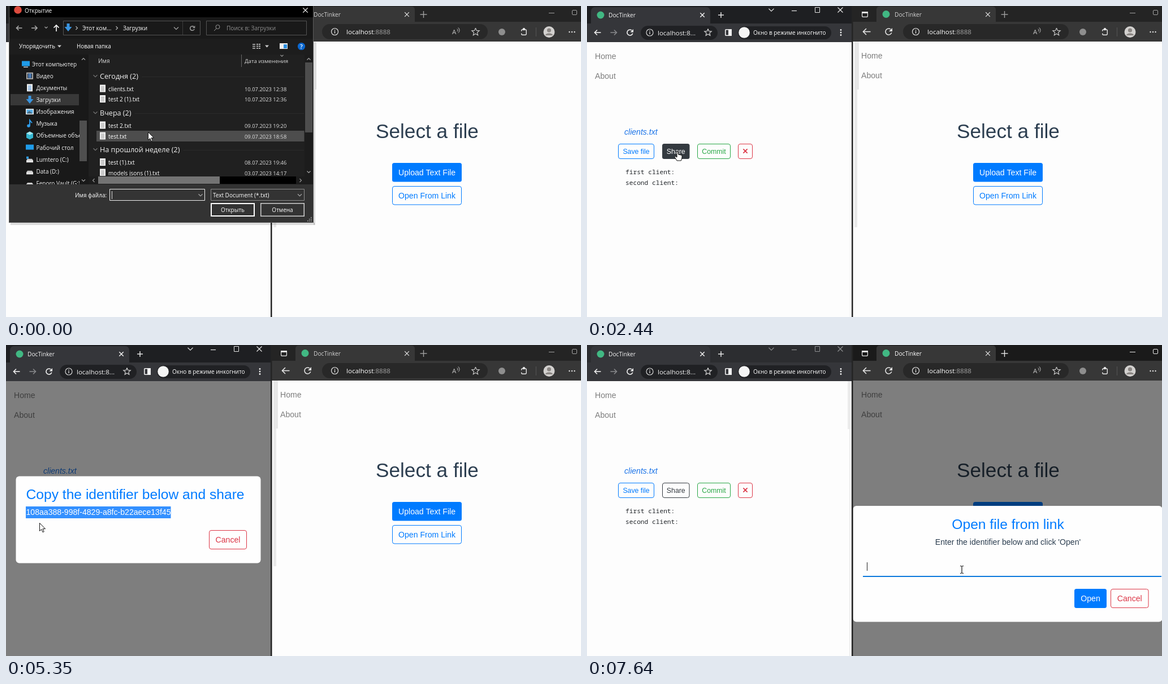
Recreate the animation shown at these times as an HTML page with a canvas. Size 1017x551 px, loop 8 s.

```html
<!DOCTYPE html>
<html lang="ru">
<head>
<meta charset="utf-8">
<title>DocTinker</title>
<style>
html, body { margin: 0; width: 100%; height: 100%; overflow: hidden; background: #fdfdfd; }
canvas { display: block; width: 1017px; height: 551px; }
</style>
</head>
<body>
<canvas id="stage" width="1017" height="551"></canvas>
<script>
const W = 1017, H = 551, LOOP = 8000;
const UI = '"Open Sans", "Noto Sans", sans-serif';
const PAGE = '"Liberation Sans", Arial, sans-serif';
const MONO = '"Noto Sans Mono", "DejaVu Sans Mono", monospace';
const APP = 'DocTinker', ID = '108aa388-998f-4829-a8fc-b22aece13f45';
const BLUE = '#007bff', RED = '#dc3545', INK = '#2c3e50';
const BODY = 14.08, HEAD = 24.64;

const screen2d = document.getElementById('stage').getContext('2d');
const layer = document.createElement('canvas');
layer.width = W; layer.height = H;
const dialogCtx = layer.getContext('2d');
let c = screen2d;

// The picture only changes at these moments.
const STEPS = [0, 120, 270, 410, 550, 690, 810, 940, 1080, 1220, 1350, 1470, 1620, 1750, 1880,
  2010, 2140, 2290, 2440, 3410, 3720, 3850, 3980, 4110, 4240, 4380, 4510, 4640, 4770, 4920,
  5350, 5470, 5620, 5770, 5920, 6070, 6220, 6350, 6500, 6640, 6780, 6920, 7060, 7200, 7350, 7490, 7640];

const PATH = [[0, 251, 223], [270, 232, 150], [410, 232, 150], [690, 293, 231], [1080, 390, 361],
  [1620, 390, 361], [2140, 199, 257], [2290, 163, 257], [2440, 160, 257], [3410, 160, 256],
  [3600, 160, 256], [3980, 314, 297], [4110, 314, 297], [4640, 36, 303], [4770, 35, 304],
  [4920, 30, 300], [5350, 59, 315], [5770, 398, 352], [6070, 401, 353], [6350, 682, 345],
  [6500, 738, 338], [6780, 738, 338], [7200, 663, 398]];

function pointer(t) {
  let i = PATH.length - 1;
  while (PATH[i][0] > t) i--;
  const a = PATH[i], b = PATH[i + 1] || a;
  const k = b === a ? 0 : (t - a[0]) / (b[0] - a[0]);
  return [a[1] + (b[1] - a[1]) * k, a[2] + (b[2] - a[2]) * k];
}

// Drawing helpers
function box(x, y, w, h, fill, r = 0) {
  c.fillStyle = fill;
  c.beginPath(); c.roundRect(x, y, w, h, r); c.fill();
}
function frame(x, y, w, h, color, r = 0, lw = 1) {
  c.strokeStyle = color; c.lineWidth = lw;
  c.beginPath(); c.roundRect(x + lw / 2, y + lw / 2, w - lw, h - lw, r); c.stroke();
}
function dot(x, y, r, fill) {
  c.fillStyle = fill;
  c.beginPath(); c.arc(x, y, r, 0, 7); c.fill();
}
function arc(x, y, r, color, from = 0, to = 7, lw = 1.2) {
  c.strokeStyle = color; c.lineWidth = lw;
  c.beginPath(); c.arc(x, y, r, from, to); c.stroke();
}
function trace(pts) {
  c.beginPath();
  for (let i = 0; i < pts.length; i += 2) c.lineTo(pts[i], pts[i + 1]);
}
function line(pts, color, lw = 1) {
  trace(pts);
  c.strokeStyle = color; c.lineWidth = lw; c.stroke();
}
function poly(pts, fill) {
  trace(pts);
  c.closePath(); c.fillStyle = fill; c.fill();
}
function text(s, x, y, size, color, font = UI, align = 'left', style = '') {
  c.font = `${style} ${size}px ${font}`;
  c.textAlign = align; c.fillStyle = color;
  c.fillText(s, x, y);
}
function clip(x, y, w, h, draw) {
  c.save();
  c.beginPath(); c.rect(x, y, w, h); c.clip();
  draw();
  c.restore();
}
const label = (s, x, y, color = '#fff', size = 10) => text(s, x, y, size, color);
const cross = (x, y, r, color, lw = 1.2) => {
  line([x - r, y - r, x + r, y + r], color, lw);
  line([x - r, y + r, x + r, y - r], color, lw);
};
const plus = (x, y, r, color) => {
  line([x - r, y, x + r, y], color, 1.4);
  line([x, y - r, x, y + r], color, 1.4);
};
const chevron = (x, y, r, color, dir = 1) =>
  line([x - r, y - r / 2 * dir, x, y + r / 2 * dir, x + r, y - r / 2 * dir], color, 1.1);
const sideChevron = (x, y, color, dir = 1) =>
  line([x - 1.5 * dir, y - 3, x + 1.5 * dir, y, x - 1.5 * dir, y + 3], color, 1.1);
const arrow = (x, y, dir, color, r = 5.5) => {
  line([x - r, y, x + r, y], color, 1.6);
  line([x + dir, y - r + 1, x + dir * r, y, x + dir, y + r - 1], color, 1.6);
};
function reload(x, y, r, color) {
  arc(x, y, r, color, 0.3, 5.4, 1.6);
  poly([x + r + 1, y - r - 1, x + r + 1, y - 0.5, x + 0.5, y - 0.5], color);
}
function star(x, y, r, color) {
  const pts = [];
  for (let i = 0; i <= 10; i++) {
    const a = i * Math.PI / 5 - Math.PI / 2, q = i % 2 ? r * 0.45 : r;
    pts.push(x + q * Math.cos(a), y + q * Math.sin(a));
  }
  line(pts, color, 1.2);
}
function info(x, y, color) {
  arc(x, y, 6, color);
  box(x - 0.7, y - 1, 1.4, 4, color);
  box(x - 0.7, y - 3.4, 1.4, 1.4, color);
}
function button(x, y, w, h, s, color, solid, size = BODY) {
  if (solid) box(x, y, w, h, color, 3.5);
  else frame(x, y, w, h, color, 3.5);
  text(s, x + w / 2, y + h / 2 + size * 0.34, size, solid ? '#fff' : color, PAGE, 'center');
}

// Browser bars
function leftBar(active) {
  const ctl = active ? '#e4e4e4' : '#8d8e90', fg = '#f1f1f1';
  box(0, 0, 468, 64, active ? '#1e1f22' : '#2c2d30');
  box(7, 2, 211, 36, '#35363a', 7);
  box(0, 31, 468, 33, '#35363a');
  dot(24, 16, 6.5, '#41b883');
  label(APP, 38, 20, '#f4f4f4', 10.2);
  cross(204, 16, 3.7, fg, 1.5);
  plus(237, 16, 5, fg);
  chevron(326, 7, 4.5, ctl);
  line([362, 8.5, 371, 8.5], ctl, 1.2);
  frame(403, 2, 9, 10, ctl);
  cross(448, 7, 4.5, ctl);
  arrow(19, 47, -1, fg);
  arrow(47, 47, 1, '#87888b');
  reload(76, 47, 5, fg);
  box(95, 35, 136, 25, '#202124', 12.5);
  info(111, 47, '#d5d5d5');
  label('localhost:8...', 125, 51.5, '#f4f4f4', 11.5);
  star(214, 47, 6.5, '#d5d5d5');
  frame(244, 41, 12, 12, fg, 1, 1.6);
  box(250, 41, 6, 12, fg);
  box(267, 36, 165, 23, '#202124', 11.5);
  dot(278, 47, 9.8, '#f4f4f4');
  label('Окно в режиме инкогнито', 294, 51, '#fff', 10);
  for (const y of [42.5, 47, 51.5]) dot(449, y, 1.4, fg);
}

function rightBar(active) {
  const ctl = active ? '#e8e8e8' : '#a2a2a2', fg = '#e6e6e6';
  box(470, 0, 547, 63, active ? '#1a1a1a' : '#242424');
  box(512, 1, 211, 34, '#373737', 5);
  box(470, 28, 547, 35, '#373737');
  frame(486, 10, 11, 10, fg, 2, 1.2);
  box(486, 10, 11, 3, fg);
  dot(529, 14.5, 6.5, '#41b883');
  label(APP, 544, 18.5, active ? '#fff' : '#d2d2d2', 10.2);
  cross(709, 15, 3.8, fg);
  plus(738.5, 15, 6, ctl);
  line([960, 12.5, 970, 12.5], ctl);
  frame(1001, 7, 9, 9, ctl, 1.5);
  arrow(495, 45.5, -1, fg, 6.5);
  reload(533.5, 45.5, 5.5, fg);
  box(559, 32, 293, 27, '#282828', 13.5);
  info(581.5, 45.5, fg);
  label('localhost', 602, 50, '#fff', 11.55);
  const w = c.measureText('localhost').width;
  label(':8888', 602 + w, 50, '#a4a4a4', 11.55);
  label('A', 789, 50, '#c4c4c4', 11.5);
  arc(796, 43, 3, '#c4c4c4', -0.9, 0.9, 1);
  arc(796, 43, 6, '#c4c4c4', -0.9, 0.9, 1);
  star(830.5, 46, 7, '#c4c4c4');
  dot(877, 46, 6, '#8e8e8e');
  frame(911, 41, 10, 11, fg, 2, 1.4);
  dot(916, 41, 2.2, fg); dot(911.5, 46.5, 2, '#373737');
  box(937, 38, 1, 16, '#555');
  dot(960.5, 46, 10, '#d3d1cf');
  dot(960.5, 43, 3.6, '#8a8683');
  c.fillStyle = '#8a8683';
  c.beginPath(); c.ellipse(960.5, 52, 6.5, 3.8, 0, Math.PI, 0); c.fill();
  for (const x of [996.5, 1001, 1005.5]) dot(x, 46, 1.2, fg);
}

const menu = (x, y) => {
  text('Home', x, y, BODY, '#7d7d7d', PAGE);
  text('About', x, y + 35, BODY, '#7d7d7d', PAGE);
};
function picker(dx, dy, upload, linkHover) {
  text('Select a file', 654 + dx, 234 + dy, 35.2, INK, PAGE);
  button(683 + dx, 278 + dy, 123, 33.5, 'Upload Text File', upload, true);
  button(683 + dx, 319 + dy, 123, 33.5, 'Open From Link', BLUE, linkHover);
}
function editor(shareHover) {
  text('clients.txt', 66, 228, BODY, '#1a73e8', PAGE, 'left', 'italic');
  const size = 12.32;
  button(55, 244, 64, 27, 'Save file', BLUE, false, size);
  button(133, 244, 48.5, 27, 'Share', '#343a40', shareHover, size);
  button(195, 244, 59, 27, 'Commit', '#28a745', false, size);
  frame(267, 244, 26, 27, RED, 3.5);
  cross(280, 257, 3.6, RED, 1.7);
  text('first client:', 68, 298, 11.2, '#212529', MONO);
  text('second client:', 68, 317, 11.2, '#212529', MONO);
}

function shareModal(selectFrom, cancelHover) {
  box(0, 64, 468, 487, 'rgba(0,0,0,.5)');
  box(17.5, 232.5, 433, 154, '#fefefe', 6);
  text('Copy the identifier below and share', 35.5, 273, HEAD, BLUE, PAGE);
  text(ID, 35.5, 301, BODY, INK, PAGE);
  if (selectFrom < 291) {
    clip(selectFrom, 286, 291.5 - selectFrom, 21, () => {
      box(35, 286, 257, 21, '#3390ff');
      text(ID, 35.5, 301, BODY, '#fff', PAGE);
    });
  }
  button(359, 328, 67, 34, 'Cancel', RED, cancelHover);
}
function linkModal(focused, caret) {
  box(470, 63, 547, 488, 'rgba(0,0,0,.5)');
  box(470.5, 285, 547, 205.5, '#fefefe', 6);
  text('Open file from link', 744.5, 326, HEAD, BLUE, PAGE, 'center');
  text("Enter the identifier below and click 'Open'", 744.5, 354, BODY, INK, PAGE, 'center');
  box(488, focused ? 409 : 410, 528, focused ? 2 : 1, focused ? '#0b78dc' : '#aaa');
  if (caret) box(495, 385, 1, 15, '#222');
  button(862, 432, 57, 34, 'Open', BLUE, true);
  button(926, 432, 67.5, 34, 'Cancel', RED, false);
}

// File dialog
function downArrow(x, y) {
  poly([x - 2.5, y - 7, x + 2.5, y - 7, x + 2.5, y - 1, x + 6.5, y - 1, x, y + 7, x - 6.5, y - 1, x - 2.5, y - 1], '#3a95e0');
}
function sheet(x, y, mark = '#9a9a9a') {
  box(x - 5, y - 6.5, 10, 13, '#f0f0f0');
  for (let i = 0; i < 4; i++) box(x - 3, y - 3.5 + i * 2.3, 6, 1, mark);
}
function disk(x, y) {
  poly([x - 4, y - 1, x + 4, y - 1, x + 6, y + 2, x - 6, y + 2], '#c9c9c9');
  box(x - 6, y + 1.5, 12, 4, '#e4e4e4');
}
const display = (x, y) => box(x - 7, y - 5, 14, 9, '#1f9be8');
const PLACES = [
  ['Этот компьютер', (x, y) => { display(x, y); box(x - 4, y + 5, 8, 1.5, '#ccc'); }],
  ['Видео', (x, y) => { frame(x - 6, y - 6, 12, 12, '#aaa', 0, 2); box(x - 3, y - 4, 6, 8, '#4a78b0'); }],
  ['Документы', (x, y) => sheet(x, y, '#4a90d9')],
  ['Загрузки', downArrow],
  ['Изображения', (x, y) => {
    box(x - 7, y - 5, 14, 10, '#eee'); box(x - 5.5, y - 3.5, 11, 7, '#59aee6');
    poly([x - 5.5, y + 3.5, x - 1, y - 1, x + 5.5, y + 3.5], '#47687d');
  }],
  ['Музыка', (x, y) => { dot(x - 2, y + 4, 2.8, '#2f9be8'); line([x, y + 4, x, y - 6, x + 4, y - 1], '#2f9be8', 2); }],
  ['Объемные объекты', (x, y) => {
    poly([x, y - 7, x + 6, y - 4, x + 6, y + 4, x, y + 7, x - 6, y + 4, x - 6, y - 4], '#35b6d0');
    poly([x, y - 7, x + 6, y - 4, x, y - 1, x - 6, y - 4], '#a5e7ef');
  }],
  ['Рабочий стол', display],
  ['Lumtero (C:)', (x, y) => { disk(x, y); box(x - 6, y - 5, 4, 4, '#2f9be8'); }],
  ['Data (D:)', disk],
  ['Fenoro Vault (G:)', disk]
];
const GROUPS = [[124, 'Сегодня (2)'], [189, 'Вчера (2)'], [254, 'На прошлой неделе (2)']];
const FILES = [
  [146.5, 'clients.txt', '10.07.2023 12:38'],
  [165, 'test 2 (1).txt', '10.07.2023 12:36'],
  [211.5, 'test 2.txt', '09.07.2023 19:20'],
  [230.5, 'test.txt', '09.07.2023 18:58'],
  [277, 'test (1).txt', '08.07.2023 19:46'],
  [295.5, 'models jsons (1).txt', '03.07.2023 14:17']
];

function sidebar() {
  clip(7, 86, 124, 230, () => {
    box(8, 156, 121, 20, '#383838');
    PLACES.forEach(([name, icon], i) => {
      const y = 102.5 + i * 21.15;
      icon(i ? 42 : 35, y);
      label(name, i ? 53.5 : 46, y + 4, '#f4f4f4');
    });
  });
  box(130, 86, 15, 230, '#191919');
  box(130, 203, 13, 72, '#4f4f4f');
  chevron(137, 94, 3, '#aaa', -1);
  chevron(137, 309, 3, '#aaa');
}

function fileList(hoverY, picked) {
  box(146, 86, 382, 230, '#202020');
  label('Имя', 163, 100.5, '#d8d8d8');
  box(416, 86, 1, 22, '#666');
  label('Дата изменения', 422, 100.5, '#d8d8d8', 9.7);
  chevron(488, 88, 2.5, '#999');
  clip(146, 108, 382, 193, () => {
    for (const [y, name] of GROUPS) {
      chevron(158, y, 3.5, '#777');
      text(name, 166, y + 4.5, 12.6, '#f0f0f0');
      const end = 172 + c.measureText(name).width;
      box(end, y + 1, 527 - end, 1, '#2b2b2b');
    }
    FILES.forEach(([y, name, date], i) => {
      if (i === 0 && picked) {
        box(160, y - 9, 367.5, 18.5, '#777');
        frame(160, y - 9, 367.5, 18.5, '#8a8a8a');
      } else if (Math.abs(y - hoverY) < 9.5) box(160, y - 9.5, 367.5, 19, '#4d4d4d');
      sheet(171, y - 0.5);
      label(name, 181, y + 4);
      label(date, 422, y + 4, '#dedede', 9.4);
    });
  });
  box(146, 302, 382, 14, '#1c1c1c');
  box(163, 302, 350, 13, '#000');
  box(163, 302, 215, 13, '#737373');
  sideChevron(155, 309, '#999', -1);
  sideChevron(521, 309, '#999');
  box(528, 86, 15, 230, '#1c1c1c');
  box(529, 100, 13, 124, '#4d4d4d');
  chevron(535.5, 94, 3, '#aaa', -1);
  chevron(535.5, 294, 3, '#aaa');
}

function dialog(t, cx, cy) {
  const picked = t >= 410, press = t >= 1080;
  box(544, 64, 5, 84, 'rgba(0,0,0,.13)');
  box(8, 384, 538, 4, 'rgba(0,0,0,.13)');
  box(544, 148, 3, 240, 'rgba(0,0,0,.13)');
  box(5, -17, 539, 401, '#5a5a5a');
  box(6, -17, 537, 400, '#191919');
  box(6, -17, 537, 37, '#000');
  dot(21, 7, 6.8, '#dd4b3e');
  label('Открытие', 33, 11.5);
  cross(529.5, 7.5, 4.2, '#fff');

  arrow(23.5, 39, -1, '#aaa', 5);
  arrow(50, 39, 1, '#aaa', 5);
  chevron(71, 38, 2.5, '#aaa');
  line([89, 45, 89, 34], '#fff', 1.6);
  line([84.5, 38.5, 89, 34, 93.5, 38.5], '#fff', 1.6);
  frame(101, 26, 243, 26, '#535353');
  downArrow(110, 38);
  sideChevron(125, 39, '#bbb');
  label('Этот ком...', 135, 42.5, '#fff', 10.2);
  sideChevron(196, 39, '#bbb');
  label('Загрузки', 207, 42.5);
  chevron(301, 39.5, 4, '#aaa');
  box(312, 27, 1, 24, '#3c3c3c');
  reload(329.5, 39.5, 3.8, '#999');
  frame(354, 26, 178, 26, '#535353');
  arc(374.5, 37, 3.5, '#999', 0, 7, 1);
  line([372, 40, 368, 44], '#999', 1);
  label('Поиск в: Загрузки', 390, 42.5, '#8f8f8f', 10.1);

  box(6, 58, 537, 28, '#1d1d1d');
  label('Упорядочить', 23, 75, '#fff', 9.9);
  poly([91, 69.5, 98, 69.5, 94.5, 73.5], '#ccc');
  label('Новая папка', 125, 75, '#fff', 9.9);
  for (let i = 0; i < 3; i++) {
    box(436, 67 + i * 3.5, 5, 2, '#999');
    for (const x of [443, 447]) box(x, 67 + i * 3.5, 3, 1.5, '#ddd');
  }
  poly([458, 69.5, 465, 69.5, 461.5, 73.5], '#ccc');
  box(484, 66, 14, 10, '#f0f0f0');
  box(491, 68, 6, 7, '#2d8fe0');
  dot(522.5, 71.5, 6.6, '#0b68d0');
  text('?', 522.5, 75.5, 10.5, '#fff', UI, 'center', '600');

  sidebar();
  const inList = cx > 160 && cx < 527 && cy < 301;
  fileList(inList ? cy : -99, picked);

  box(6, 316, 537, 67, '#333');
  label('Имя файла:', 122, 338.5);
  box(183, 324, 169, 21, '#343434');
  frame(183, 324, 169, 21, '#eee');
  if (t >= 1220) box(186, 327, 47, 15, '#0078d7');
  if (picked) label('clients.txt', 187, 338.5);
  else box(187, 328, 1, 14, '#ddd');
  chevron(344, 335, 3.5, '#aaa');
  frame(362, 324, 166, 21, '#8e8e8e');
  label('Text Document (*.txt)', 366, 338.5);
  chevron(519.5, 335, 3.5, '#aaa');
  if (press) box(363, 350, 76, 22, '#454545');
  frame(362, 349, 78, 24, '#fff', 0, 2);
  text('Открыть', 401, 364.5, 10, '#fff', UI, 'center');
  frame(450, 349, 78, 24, '#d0d0d0', 0, 1.5);
  text('Отмена', 489, 364.5, 10, '#fff', UI, 'center');
  for (let i = 0; i < 3; i++) for (let j = 0; j <= i; j++) box(539 - j * 3, 374 + i * 3, 1.5, 1.5, '#bbb');
}

function fadingDialog(t, cx, cy) {
  const k = Math.max(0, (t - 1220) / 250), s = 1 - 0.035 * k;
  c = dialogCtx;
  c.clearRect(0, 0, W, H);
  c.save();
  c.translate(274.5, 183); c.scale(s, s); c.translate(-274.5, -183);
  dialog(t, cx, cy);
  c.restore();
  c = screen2d;
  c.globalAlpha = 1 - 0.78 * k;
  c.drawImage(layer, 0, 0);
  c.globalAlpha = 1;
}

// Mouse pointers
function outlined(pts) {
  poly(pts, '#fff');
  c.strokeStyle = '#111'; c.lineWidth = 1; c.stroke();
}
function cursor(kind, x, y) {
  c.save();
  c.translate(x, y);
  if (kind === 'arrow') {
    outlined([0.5, 0.5, 0.5, 14.5, 3.8, 11.5, 6, 16.7, 8.2, 15.7, 6, 10.7, 10.5, 10.7]);
  } else if (kind === 'hand') {
    outlined([-1, 0.5, 1, 0.5, 1.5, 6, 8, 7.5, 8, 12, 6.5, 17, -1, 17, -5, 10.5, -4, 9, -1, 11]);
  } else {
    line([-3, -6.5, -0.8, -6.5, 0, -5.5, 0.8, -6.5, 3, -6.5], '#111');
    line([-3, 6.5, -0.8, 6.5, 0, 5.5, 0.8, 6.5, 3, 6.5], '#111');
    line([0, -6, 0, 6], '#111', 1.2);
  }
  c.restore();
}
function cursorKind(t) {
  const during = (a, b) => t >= a && t < b;
  if (during(2290, 3410) || during(5770, 6070) || during(6500, 6780)) return 'hand';
  if (during(3410, 4920) || t >= 7200) return 'beam';
  return 'arrow';
}

function draw(t) {
  const [cx, cy] = pointer(t);
  const rightActive = t >= 6640;
  box(0, 0, W, H, '#fdfdfd');

  menu(14, 93.5);
  if (t < 1620) {
    frame(171, 278, 126, 36, 'rgba(0,123,255,.4)', 4, 2);
    picker(-510, 1, '#0062cc', false);
  } else editor(t >= 2290 && t < 3410);
  if (t >= 3410 && t < 6070) {
    const from = t < 4240 ? 291 : t < 4640 ? Math.max(36, cx) : 35;
    shareModal(from, t >= 5770);
  }

  if (rightActive) {
    box(461, 64, 7, 85, '#ececec');
    box(464, 149, 4, 402, '#efefef');
  } else {
    box(473, 63, 8, 85, '#e6e6e6');
    box(473, 148, 5, 244, '#e9e9e9');
  }
  menu(485, 92.5);
  picker(0, 0, BLUE, t >= 6500 && t < 6780);
  if (t >= 6780) linkModal(t >= 7350, t >= 7640);

  leftBar(!rightActive);
  rightBar(rightActive);
  box(468, 0, 2.5, H, '#242424');

  if (t < 1620) fadingDialog(t, cx, cy);
  cursor(cursorKind(t), cx, cy);
}

function tick() {
  const now = performance.now() % LOOP;
  draw(STEPS.findLast(s => s <= now));
  requestAnimationFrame(tick);
}
tick();
</script>
</body>
</html>
```
